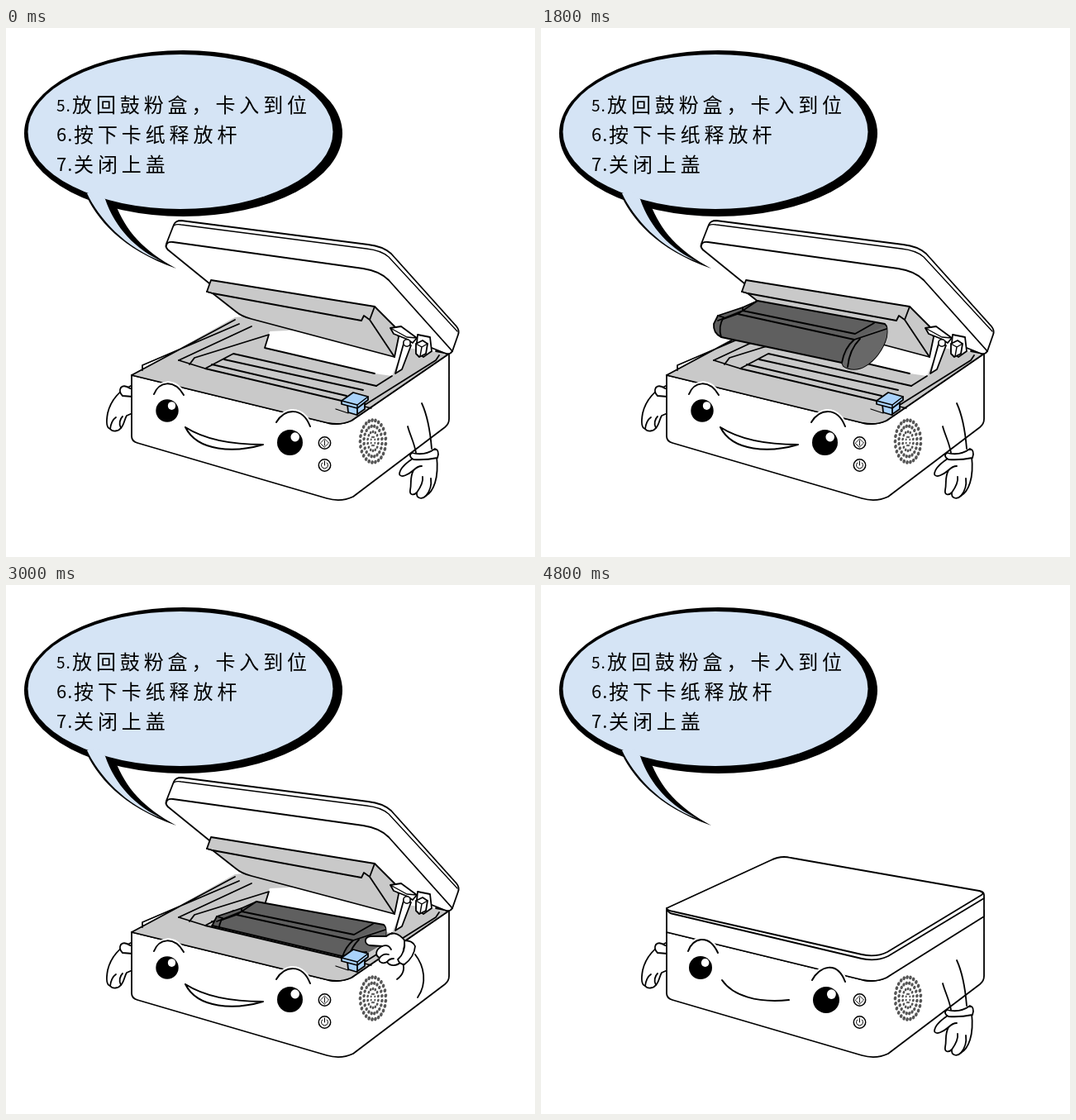
Animation of 640x640 px, one loop 6.8 s. Source, as an HTML page with a canvas:

```html
<!DOCTYPE html>
<html lang="zh">
<head>
<meta charset="utf-8">
<style>
html, body { margin: 0; width: 100%; height: 100%; overflow: hidden; background: #fff; }
canvas { display: block; }
</style>
</head>
<body>
<canvas id="stage" width="640" height="640"></canvas>
<script>
const ctx = document.getElementById('stage').getContext('2d');
const INK = '#000', SKY = '#d5e4f5', GREY = '#c9c9c9', DARK = '#5f5f5f', BLUE = '#a9d2fa';
const LOOP = 6800;

const fill = (d, color) => { ctx.fillStyle = color; ctx.fill(new Path2D(d)); };
const line = (d, width = 1.8, color = INK) => {
  ctx.strokeStyle = color;
  ctx.lineWidth = width;
  ctx.stroke(new Path2D(d));
};
const shape = (d, color = '#fff', width) => { fill(d, color); line(d, width); };
const oval = (x, y, rx, ry, color, angle = 0) => {
  ctx.beginPath();
  ctx.ellipse(x, y, rx, ry, angle, 0, Math.PI * 2);
  ctx.fillStyle = color;
  ctx.fill();
};
const ring = (x, y, r, width) => {
  ctx.beginPath();
  ctx.arc(x, y, r, 0, Math.PI * 2);
  ctx.lineWidth = width;
  ctx.strokeStyle = INK;
  ctx.stroke();
};
const shifted = (dx, dy, draw) => {
  ctx.save();
  ctx.translate(dx, dy);
  draw();
  ctx.restore();
};

function bubble() {
  oval(214.5, 127.5, 192.5, 100.5, INK);
  fill('M95 198 C108 230 140 268 206 291 C166 269 145 246 132 212 Z', INK);
  oval(211, 125.5, 184.5, 93.5, SKY);
  fill('M98 200 C112 230 144 266 190 283 C157 268 132 242 120 207 L114 198 Z', SKY);

  const rows = [['5.', '放回鼓粉盒，卡入到位', 80], ['6.', '按下卡纸释放杆', 82], ['7.', '关闭上盖', 82]];
  ctx.fillStyle = INK;
  ctx.textBaseline = 'alphabetic';
  rows.forEach(([number, text, x], i) => {
    const y = 102 + i * 36;
    ctx.letterSpacing = '1px';
    ctx.font = `${i ? 22 : 19}px "Noto Sans CJK SC", "Noto Sans CJK", sans-serif`;
    ctx.fillText(number, 61, y - 1);
    ctx.letterSpacing = '4.9px';
    ctx.font = '24px "Noto Sans CJK SC", "Noto Sans CJK", sans-serif';
    ctx.fillText(text, x, y);
  });
  ctx.letterSpacing = '0px';
}

function leftArm() {
  shape('M153 432 L147 435 C139 438 127 449 123 466 C121 477 122 484 126 485 C129 489 136 488 139 484 C143 480 143 474 146 469 L153 466 Z');
  shape('M153 446 L141 445 Q136 440 139 435 Q143 431 150 436 L153 437');
  line('M126 485 C127 478 130 473 133 471 M139 484 C136 479 138 473 141 470');
}

function body() {
  shape('M152 420 L152 494 Q152 500 159 502 L388 569 Q405 574 420 567 L531 483 Q536 479 536 473 L536 394 L418 475 Q405 481 390 478 Z');
}

function rightArmDown() {
  line('M503 454 C509 467 513 485 515 509 M486 482 C489 493 494 502 496 514');
  shape('M492 521 C483 527 476 534 476 540 C478 545 487 540 493 535 C488 545 491 550 489 559 C488 565 493 566 497 562 C496 569 503 571 508 566 C517 561 524 545 521 518 Z');
  line('M497 562 C502 555 505 549 504 543 M508 566 C514 559 515 552 514 545 M493 535 C497 531 500 530 503 530');
  shape('M491 514 Q507 518 519 509 Q525 511 522 520 Q507 523 493 522 Q486 518 491 514 Z');
}

function pointingHand(dx, dy) {
  const elbow = `${495 + dx} ${447 + dy}`, wrist = `${480 + dx} ${457 + dy}`;
  const sleeve = `M${elbow} C${506 + dx / 2} ${461 + dy / 2} 510 482 498 499`;
  const under = `M${wrist} C${483 + dx / 2} ${466 + dy / 2} 480 472 473 477`;
  line(sleeve + under);
  shifted(dx, dy, () => {
    shape('M483 431 C474 419 466 420 460 425 L441 425 C433 426 433 434 440 436 L455 437 C447 441 446 448 452 451 C449 456 456 459 461 456 C465 462 473 461 478 456 Z');
    line('M455 437 C460 435 464 437 466 441 M452 451 C455 447 459 446 463 447 M461 456 C463 453 466 452 469 452');
    shape('M482 430 Q492 430 495 437 Q494 450 482 459 Q476 459 474 453 Q484 444 482 430 Z');
  });
}

function speaker() {
  const rings = [[17, 27, 25, 2.4], [12.5, 20, 20, 2.2], [8, 13, 14, 1.8], [4, 7, 8, 1.3]];
  for (const [rx, ry, count, size] of rings) {
    for (let i = 0; i < count; i++) {
      const a = (i + 0.5) / count * Math.PI * 2;
      oval(444 + Math.cos(a) * (rx - 1.5), 500 + Math.sin(a) * (ry - 1.5), size * 0.75, size, '#555', 0.3);
    }
  }
}

function buttons() {
  ring(385.5, 502, 7.2, 1.5);
  ring(385.5, 529, 7.2, 1.5);
  line('M380.5 502 L385.5 497 L390.5 502 L385.5 507 Z M385.5 499 V505', 0.9);
  line('M382.7 526 A4 4 0 1 0 388.3 526 M385.5 524 V529', 1);
}

function eye(x, y, r) {
  oval(x, y, r, r, INK);
  oval(x + r * 0.4, y - r * 0.43, r * 0.34, r * 0.36, '#fff');
}

function brow(d) {
  fill(d, '#fff');
  line(d, 6, '#fff');
  line(d, 2);
}

function face(closed) {
  if (closed) {
    brow('M178 443 C183 427 203 421 214 445');
    brow('M328 478 C337 461 358 454 368 480');
    eye(193, 463, 14);
    eye(345, 502, 16);
    line('M219 478 C232 497 262 506 300 502', 2);
  } else {
    brow('M179 443 C185 428 203 424 215 444');
    brow('M327 477 C337 461 358 457 368 482');
    eye(195, 463, 13.7);
    eye(343.5, 501.5, 15.5);
    shape('M217 483 C239 497 273 504 311 504 C277 514 232 513 217 483 Z', '#fff', 2);
  }
}

function deck() {
  fill('M152 420 L277 350 L330 345 L470 385 L522 392 L536 394 L418 475 Q405 481 390 478 Z', GREY);
  fill('M319 367 L313 387 L446 418 L467 421 L482 384 L470 360 Z', '#fff');
  line('M152 420 L277 353 M165 414 L165 408 L282 358 M209 402 L297 361 M222 407 L228 399 L318 371 L313 387 L446 418');
  line('M209 402 L241 412 L275 394 L448 433 M264 401 L432 438 M249 407 L412 445 M241 412 L406 451');
  line('M434 456 L520 402 L524 396 M467 421 L448 433');
  line('M152 420 L390 478 Q405 481 418 475 L536 394 L520 391');
}

function lid() {
  fill('M193 263 L203 238 Q205 233 212 233 L438 262 Q456 264 466 273 L545 361 Q549 366 547 371 L540 391 Q537 396 530 393 L470 365 L246 309 L198 270 Z', '#fff');
  line('M246 309 L198 270 Q192 266 194 261 L203 238 Q205 233 212 233 L438 262 Q456 264 466 273 L545 361 Q549 366 547 371 L540 391 Q537 396 530 393 L515 387');
  line('M203 239 Q206 237 212 238 L436 267 Q454 269 463 277 L546 367', 1.3);
  line('M194 263 Q195 258 202 259 L432 291 Q452 294 463 305 L540 391');
}

function head() {
  shape('M248 305 L446 337 L471 362 L475 374 L470 398 L297 352 Q285 349 278 343 L250 321 L243 319 Z', GREY);
  line('M243 319 L250 321 L430 354 L433 348 L440 353 L446 337 M440 353 L470 398');
}

function hinge() {
  shape('M498 371 L513 374 L515 391 L505 398 L496 391 Z');
  shape('M496 382 L504 378 L510 382 L508 394 L500 398 L496 394 Z');
  line('M496 382 L503 386 L510 382 M503 386 L501 397', 1.4);
  shape('M481 382 L471 418 L479 413 L490 384 Z');
  shape('M465 363 L478 361 L497 375 L492 381 L484 376 L469 370 Z');
  line('M465 363 L485 374 L497 375', 1.4);
  oval(485, 381, 4.5, 4.5, '#fff');
  ring(485, 381, 4.2, 1.6);
}

function cartridge() {
  shape('M222 306 L376 334 Q380 337 378 350 C374 365 363 379 352 385 C344 390 333 390 326 385 L324 381 L178 350 Q168 345 169 334 L174 324 L204 314 Z', DARK);
  fill('M339 353 L376 336 Q380 337 378 350 C374 365 363 379 352 385 C344 390 333 390 326 385 L324 381 Z', '#686868');
  line('M204 318 L340 346 L363 333 M198 322 L339 353 L378 340 M204 314 L204 318 L174 330 M222 306 L204 318 L198 322');
  line('M339 353 Q327 363 324 381 M346 352 Q333 365 331 386 M174 324 L181 326 M181 326 Q174 337 178 350 M198 322 L181 328');
}

function seatedCartridge(dx, dy) {
  ctx.save();
  ctx.clip(new Path2D('M230 340 H480 V420 L436 446 L406 449 L249 412 L230 405 Z'));
  shifted(dx, dy, cartridge);
  ctx.restore();
  line('M249 412 L406 449 L436 444');
}

function lever(down) {
  line('M399 461 L414 466 M430 457 L442 460', 1.3);
  if (down) {
    shape('M406 459 L420 450 L437 455 L424 466 Z', BLUE);
    line('M406 459 L406 462 L424 468 L437 458 L437 455', 1.5);
    line('M412 458 L423 461 L433 454', 1);
  } else {
    shape('M413 455 L414 465 L424 468 L434 461 L434 451 Z', BLUE);
    line('M425 458 L425 468');
    shape('M406 451 L420 441 L438 446 L438 450 L425 460 L406 455 Z', BLUE);
    line('M406 451 L425 456 L438 446 M425 456 V460', 1.5);
  }
}

function closedPrinter() {
  leftArm();
  body();
  shape('M152 420 L152 391 L278 333 Q290 327 302 330 L530 370 Q536 371 536 375 L536 401 L418 475 Q405 481 390 478 Z');
  line('M152 391 Q153 394 160 395 L388 447 Q405 451 419 444 L533 375 Q537 372 530 370');
  line('M153 393 Q154 397 160 398 L388 452 Q405 456 420 449 L536 379');
  rightArmDown();
  face(true);
}

function openPrinter({ cart, seated, hand, pressed }) {
  leftArm();
  body();
  deck();
  lid();
  head();
  hinge();
  if (cart) (seated ? seatedCartridge(...cart) : shifted(...cart, cartridge));
  lever(pressed);
  face(false);
  if (hand) pointingHand(...hand);
  else rightArmDown();
}

// One pose per 600 ms; the last one holds until the loop ends.
const seat = { cart: [81, 77], seated: true };
const poses = [
  {},
  { cart: [-65, -28] },
  { cart: [0, 0] },
  { cart: [40, 24] },
  { cart: [60, 48] },
  { ...seat, hand: [0, 0] },
  { ...seat, hand: [-61, -21] },
  { ...seat, hand: [0, 0], pressed: true },
  { closed: true },
];

function render(time) {
  const pose = poses[Math.min(Math.floor(time / 600), poses.length - 1)];
  ctx.fillStyle = '#fff';
  ctx.fillRect(0, 0, 640, 640);
  ctx.lineJoin = ctx.lineCap = 'round';
  bubble();
  if (pose.closed) closedPrinter();
  else openPrinter(pose);
  speaker();
  buttons();
}

const start = performance.now();
function tick() {
  render((performance.now() - start) % LOOP);
  requestAnimationFrame(tick);
}
tick();
</script>
</body>
</html>
```
